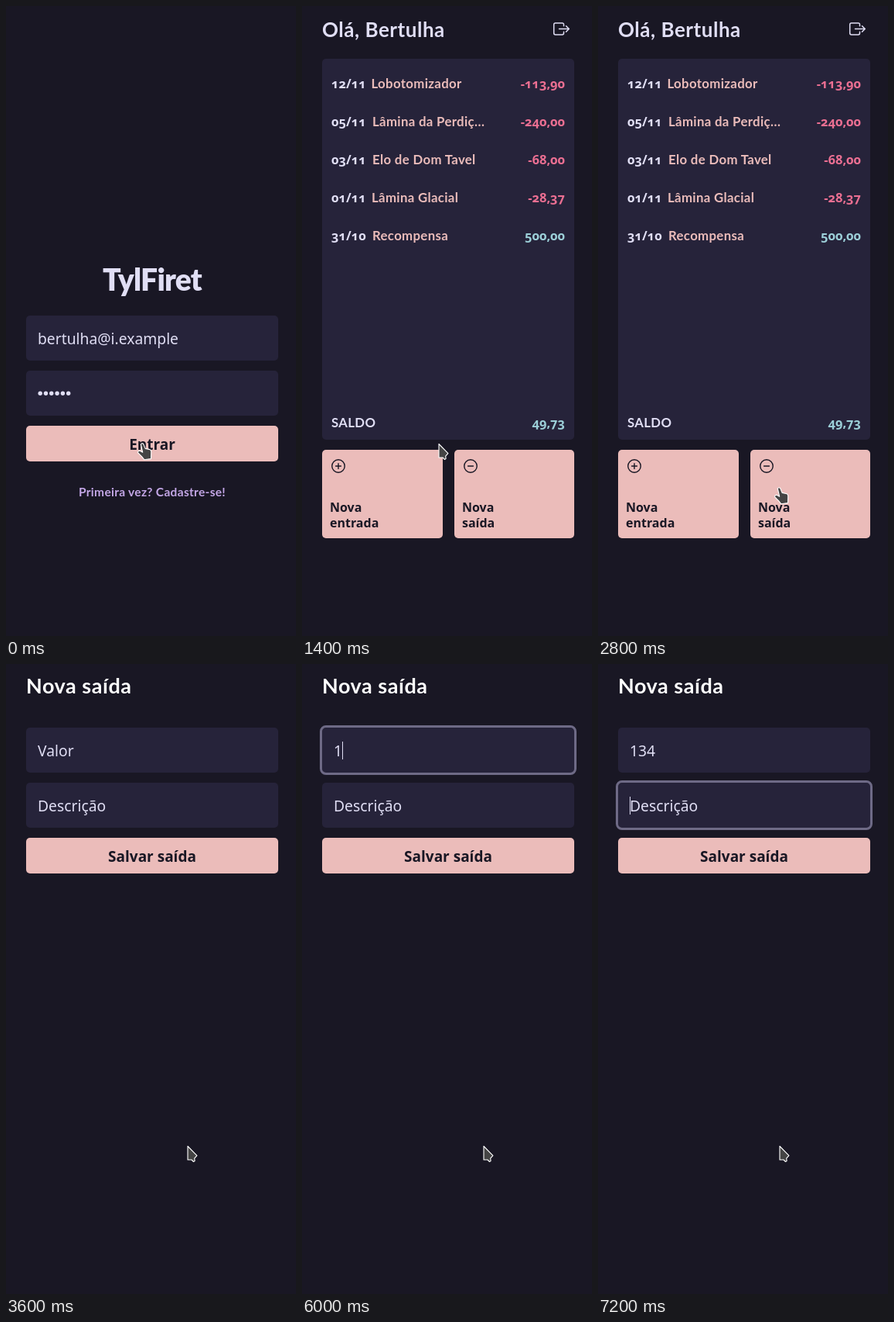
These frames come from a looping animation (375x812 px, 8000 ms). An HTML page:

```html
<!DOCTYPE html>
<html lang="pt-BR">
<head>
<meta charset="utf-8">
<title>Carteira</title>
<style>
html, body { margin: 0; width: 100%; height: 100%; overflow: hidden; background: #191724; }
svg { display: block; width: 375px; height: 812px; }
text { fill: #e0def4; white-space: pre; }
.brand { font-family: Lato, sans-serif; font-weight: 900; letter-spacing: -.02em; }
.head { font-family: Lato, sans-serif; font-weight: 700; letter-spacing: .02em; }
.body { font-family: "Noto Sans", "Open Sans", sans-serif; font-size: 19.3px; }
.bold { font-family: "Noto Sans", "Open Sans", sans-serif; font-weight: 700; }
.num { font-family: "Noto Sans", "Open Sans", sans-serif; font-weight: 700; font-size: 16.4px; font-variant-numeric: oldstyle-nums; }
</style>
</head>
<body>
<svg id="stage" viewBox="0 0 375 812" xmlns="http://www.w3.org/2000/svg"></svg>
<script>
const LOOP = 8000;
const C = {
  base: '#191724', panel: '#26233a', text: '#e0def4', rose: '#ebbcba',
  love: '#eb6f92', foam: '#9ccfd8', iris: '#c4a7e7', ring: '#6e6a86'
};

const box = (x, y, w, h, fill) =>
  `<rect x="${x}" y="${y}" width="${w}" height="${h}" rx="5" fill="${fill}"/>`;
const text = (cls, x, y, str, { size, fill = C.text, anchor = 'start', id = '' } = {}) =>
  `<text class="${cls}" x="${x}" y="${y}" text-anchor="${anchor}" ${id && `id="${id}"`}
    style="fill:${fill};${size ? `font-size:${size}px` : ''}">${str}</text>`;
const field = y => box(26, y, 326, 58, C.panel);
const button = (y, label) => box(26, y, 326, 46, C.rose) +
  text('bold', 189, y + 30.5, label, { size: 19, fill: C.base, anchor: 'middle' });
const group = (id, body) => `<g id="${id}">${body}</g>`;

const dots = Array.from({ length: 6 }, (_, i) =>
  `<circle cx="${44.2 + i * 7.3}" cy="499.3" r="2.7" fill="${C.text}"/>`).join('');

const login = text('brand', 189, 367, 'TylFiret', { size: 39, anchor: 'middle' }) +
  field(399) + text('body', 41, 435.7, 'bertulha@i.example') +
  field(470) + dots + button(541, 'Entrar') +
  text('head', 189, 632, 'Primeira vez? Cadastre-se!', { size: 15.5, fill: C.iris, anchor: 'middle' });

const card = (x, w, sign, word) => box(x, 572, w, 114, C.rose) +
  `<g transform="translate(${x + 21} 593)" fill="none" stroke="${C.base}" stroke-width="1.4" stroke-linecap="round">
    <circle r="8.25"/><path d="M-3.4 0H3.4${sign === '+' ? 'M0 -3.4V3.4' : ''}"/></g>` +
  text('bold', x + 10, 652, 'Nova', { size: 16, fill: C.base }) +
  text('bold', x + 10, 672, word, { size: 16, fill: C.base });

const exitIcon = `<path d="M338.5 25.7v-1.8a1.9 1.9 0 0 0 -1.9 -1.9h-9a1.9 1.9 0 0 0 -1.9 1.9v11.2a1.9 1.9 0 0 0 1.9 1.9h9a1.9 1.9 0 0 0 1.9 -1.9v-1.8M341.5 25.7l3.8 3.8l-3.8 3.8M332.5 29.5h12.8"
  fill="none" stroke="${C.text}" stroke-width="1.5" stroke-linecap="round" stroke-linejoin="round"/>`;

const home = text('head', 26, 39.5, 'Olá, Bertulha', { size: 26 }) + exitIcon +
  box(26, 68, 326, 491, C.panel) + card(26, 156, '+', 'entrada') + card(197, 155, '-', 'saída');

const empty = ['Não há registros', 'de entrada ou', 'saída'].map((line, i) =>
  text('head', 189, 278 + i * 20, line, { size: 20.8, anchor: 'middle' })).join('');

const rows = [
  ['12/11', 89.5, 'Lobotomizador', '-113,90'],
  ['05/11', 91, 'Lâmina da Perdiç…', '-240,00'],
  ['03/11', 91, 'Elo de Dom Tavel', '-68,00'],
  ['01/11', 90, 'Lâmina Glacial', '-28,37'],
  ['31/10', 91, 'Recompensa', '500,00']
];
const amount = (y, str) =>
  text('num', 340, y, str, { fill: str[0] === '-' ? C.love : C.foam, anchor: 'end' });
const list = rows.map(([date, x, name, value], i) => {
  const y = 106 + i * 49;
  return text('num', 38, y, date) +
    text('head', x, y, name, { size: 16.8, fill: C.rose }) + amount(y, value);
}).join('') + text('head', 38, 543, 'SALDO', { size: 16.8 }) + amount(543, '49,73');

const form = text('head', 26, 38, 'Nova saída', { size: 27, fill: '#fff' }) +
  field(82) + field(153) +
  `<rect id="ring" x="24.5" width="329" height="61" rx="6.5" fill="none" stroke="${C.ring}" stroke-width="3"/>` +
  text('body', 41, 119, '', { id: 'value' }) + text('body', 41, 190, 'Descrição') +
  `<rect id="caret" width="1" height="23" fill="${C.text}"/>` + button(224, 'Salvar saída');

const pointer = (id, d) =>
  `<path id="${id}" d="${d}" fill="#444" stroke="#fff" stroke-width="1.1" stroke-linejoin="round"/>`;

const stage = document.getElementById('stage');
stage.innerHTML = `<rect width="375" height="812" fill="${C.base}"/>` +
  group('login', login) + group('home', home) + group('empty', empty) +
  group('list', list) + group('form', form) +
  group('cursor',
    pointer('arrow', 'M.5 .5V18H5.5L8 20.5L9.6 19.6L9.2 16.2L12.4 12.6Z') +
    pointer('hand', 'M-2.2 1Q-.6 -1.2 1.2 .5L3.6 6.4L9.8 7.8Q11.4 8.6 11.3 11L11 19.6L2.2 20.7L-1 16.6L-5.8 11.8Q-6.2 9.2 -3.4 9.3L.2 11.2Z'));

const el = {};
stage.querySelectorAll('[id]').forEach(node => el[node.id] = node);
const show = (id, on) => { el[id].style.display = on ? '' : 'none'; };
const set = (id, attrs) => Object.entries(attrs).forEach(([k, v]) => el[id].setAttribute(k, v));

// The pointer is sampled every 100 ms while it glides.
function glide(t) {
  const step = Math.max(0, Math.min(4, Math.floor(t / 100) - 24)) / 4;
  return step * step * (3 - 2 * step);
}

function draw(t) {
  const inForm = t >= 3600, inHome = t >= 1100 && !inForm;
  show('login', t < 1100);
  show('home', inHome);
  show('empty', inHome && t < 1400);
  show('list', inHome && t >= 1400);
  show('form', inForm);

  const p = glide(t), x = 176.5 + 58 * p, y = 564 + 57 * p;
  const overCard = inHome && y >= 572 && (x < 182 || x > 197);
  const hand = t < 1100 || overCard;
  set('cursor', { transform: `translate(${x} ${y})` });
  show('hand', hand);
  show('arrow', !hand);

  const typed = t < 6000 ? 0 : Math.min(3, Math.floor((t - 6000) / 100) + 1);
  const second = t >= 7200;
  el.value.textContent = typed ? '134'.slice(0, typed) : 'Valor';
  show('ring', t >= 4900);
  set('ring', { y: second ? 151.5 : 80.5 });
  show('caret', t >= 4900 && (t < 6700 || second));
  set('caret', { x: second ? 41 : Math.round(41 + typed * 11.1), y: second ? 171 : 100 });
}

const start = performance.now();
function tick() {
  draw((performance.now() - start) % LOOP);
  requestAnimationFrame(tick);
}
draw(0);
requestAnimationFrame(tick);
</script>
</body>
</html>
```
